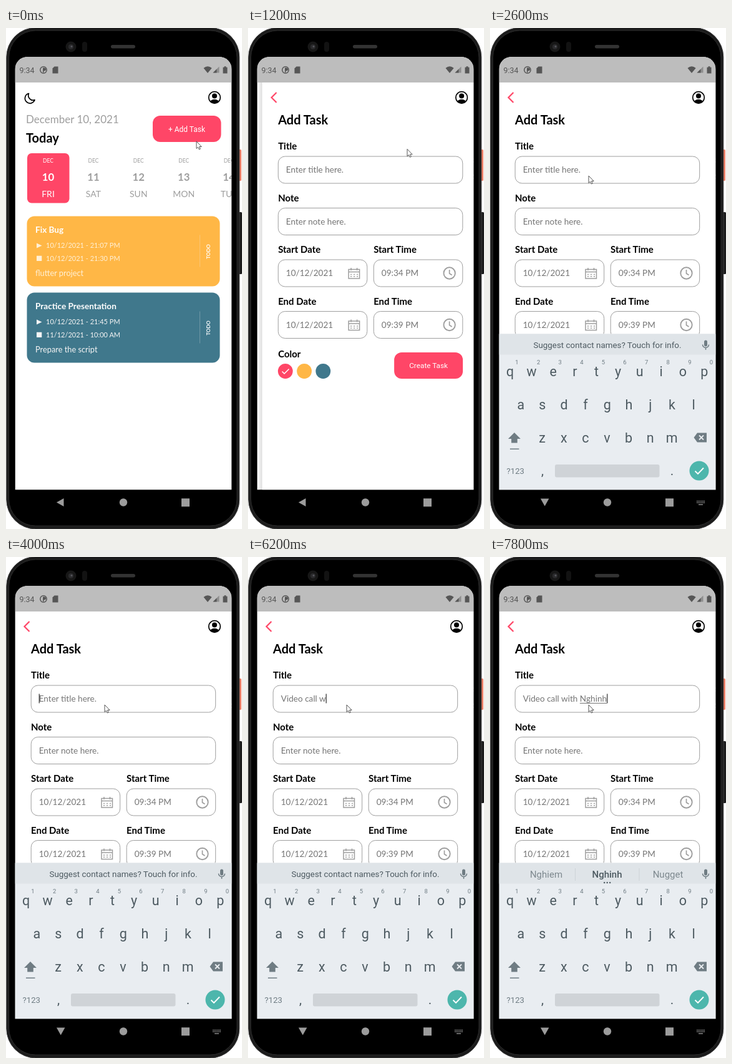
An HTML page that plays this animation: 378x800 px, repeating every 8000 ms.

```html
<!DOCTYPE html>
<html lang="en">
<head>
<meta charset="utf-8">
<title>Add task</title>
<style>
html, body { margin: 0; height: 100%; overflow: hidden; background: #fff; }
svg { display: block; width: 100%; height: 100%; }
text { font-family: Lato, sans-serif; white-space: pre; }
.kb text, .ui { font-family: Roboto, sans-serif; }
.mid { text-anchor: middle; }
.b { font-weight: 700; }
.line { fill: none; stroke: #9e9e9e; }
</style>
</head>
<body>
<svg viewBox="0 0 378 800">
  <defs>
    <clipPath id="screen"><rect x="14.5" y="46" width="347" height="732" rx="20"/></clipPath>
    <clipPath id="app"><path d="M14.5 46H361.5V737.5H14.5z"/></clipPath>
    <clipPath id="face"><circle cx="334" cy="111" r="9"/></clipPath>
    <linearGradient id="shade"><stop stop-color="#000" stop-opacity="0"/><stop offset="1" stop-color="#000" stop-opacity=".14"/></linearGradient>
    <g id="avatar">
      <circle cx="334" cy="111" r="9.3" fill="#fff" stroke="#000" stroke-width="1.7"/>
      <circle cx="334" cy="108.5" r="4"/>
      <ellipse cx="334" cy="119" rx="7.5" ry="5" clip-path="url(#face)"/>
    </g>
  </defs>

  <!-- phone body -->
  <rect x="371" y="194" width="6" height="50" rx="1.5" fill="#f08068"/>
  <rect x="371" y="294" width="7" height="99" rx="1.5" fill="#1c1c1c"/>
  <rect x=".8" y="-.5" width="373" height="800.5" rx="47" fill="#1b1b1b" stroke="#3c3c3c"/>
  <rect x="4.5" y="4" width="365.5" height="791" rx="43" stroke="#2e2e2e"/>
  <circle cx="104" cy="30" r="8.5" fill="#171717"/><circle cx="104" cy="30" r="4" fill="#2b2b2d"/><circle cx="105" cy="29.500" r="1.500" fill="#55555a"/>
  <rect x="122" y="22" width="8" height="16" rx="4" fill="#121212"/>
  <rect x="168" y="27" width="39" height="5.500" rx="2.700" fill="#333"/>

  <g clip-path="url(#screen)">
    <g clip-path="url(#app)">
      <path d="M14 46H362V738H14z" fill="#fff"/>
      <g id="home">
        <path d="M36.500 104.500A8 8 0 1 0 46 114.800A7.600 7.600 0 0 1 36.500 104.500z" fill="none" stroke="#000" stroke-width="1.700" stroke-linejoin="round"/>
        <use href="#avatar"/>
        <text x="32" y="151.500" font-size="17" fill="#9e9e9e">December 10, 2021</text>
        <text x="32" y="183" font-size="20" class="b">Today</text>
        <rect x="235" y="140" width="109.500" height="42" rx="12" fill="#ff4667"/>
        <text x="289.500" y="165.500" font-size="12" fill="#fff" class="ui mid">+ Add Task</text>
        <rect x="34" y="200" width="67.500" height="79.500" rx="7" fill="#ff4667"/>
      </g>
      <g id="form">
        <rect x="7" y="46" width="8" height="692" fill="url(#shade)"/>
        <path d="M14.500 87H362V738H14.500z" fill="#fff"/>
        <path d="M37.500 103L29.500 111L37.500 119" fill="none" stroke="#ff4667" stroke-width="2.200"/>
        <use href="#avatar"/>
        <text x="40" y="154.300" font-size="20" class="b">Add Task</text>
        <g id="fields"></g>
        <text x="40" y="526" font-size="15" class="b">Color</text>
        <circle cx="51.700" cy="548" r="11.900" fill="#ff4667"/>
        <circle cx="82" cy="548" r="11.900" fill="#ffb746"/>
        <circle cx="112.200" cy="548" r="11.900" fill="#40788c"/>
        <path d="M46.500 548.500L50 552L57.500 544.500" fill="none" stroke="#fff" stroke-width="1.500"/>
        <rect x="226" y="518" width="110" height="42" rx="12" fill="#ff4667"/>
        <text x="281" y="543.300" font-size="11.800" fill="#fff" class="ui mid">Create Task</text>
        <path id="under" d="" stroke="#757575"/>
        <path id="caret" d="M0 218.500V233.500" stroke="#555" stroke-width="1.500"/>
      </g>

      <!-- status bar -->
      <path d="M14 46H362V87H14z" fill="#bdbdbd"/>
      <g fill="#565656">
        <text x="21.500" y="71.500" font-size="12.500" class="ui">9:34</text>
        <circle cx="60" cy="67" r="5.200" fill="none" stroke="#565656" stroke-width="1.500"/>
        <path d="M59 71V63.500H61.500A2.500 2.500 0 0 1 61.500 68.500H60.500V71z"/>
        <path d="M77.500 61.500H83.500V72.500H74.500V64.500z"/>
        <path d="M316.500 64Q323 58.500 329.700 64L323 72z"/>
        <path d="M331.500 71.500L341.500 61.500V71.500z" fill-opacity=".45"/><path d="M331.500 71.500L337.500 65.500V71.500z"/>
        <path d="M347.500 62.800H349.500V61.300H352.500V62.800H354.500V72.500H347.500z"/>
      </g>

      <!-- keyboard -->
      <g id="board" class="kb" fill="#4d5a61">
        <path d="M14 488.500H362V738H14z" fill="#e9edf1"/>
        <path d="M14 488.500H362V521.500H14z" fill="#dfe4e8"/>
        <text id="hint" x="188" y="511.300" font-size="13.400" class="mid">Suggest contact names? Touch for info.</text>
        <g id="picks">
          <path d="M136.500 497V517M239 497V517" stroke="#cdd3d7"/>
          <g class="mid" font-size="15" fill="#7d888e">
            <text x="90" y="512"></text>
            <text x="187.500" y="512" fill="#4d5a61" font-weight="500"></text>
            <text x="285" y="512"></text>
          </g>
          <g fill="#4d5a61"><circle cx="183.200" cy="520" r="1.200"/><circle cx="187.700" cy="520" r="1.200"/><circle cx="192.200" cy="520" r="1.200"/></g>
        </g>
        <g fill="#6f7c83">
          <rect x="343" y="498.500" width="5" height="10" rx="2.500"/>
          <path d="M340.500 505.500A5 5 0 0 0 350.500 505.500M345.500 510.500V514" fill="none" stroke="#6f7c83" stroke-width="1.500"/>
          <path d="M39 646L49 656H43.800V662.500H34.200V656H29z"/>
          <path d="M32 671.500H46.500V673H32z"/>
          <path d="M326.500 654L332 646.500H347V661.500H332z"/>
          <path d="M335 650.500L342 657.500M342 650.500L335 657.500" stroke="#e9edf1" stroke-width="1.800"/>
          <text x="26.500" y="711.700" font-size="13.200">?123</text>
        </g>
        <g id="keys" class="mid" font-size="21.500"></g>
        <rect x="104" y="697" width="167.500" height="20.500" rx="3" fill="#cfd3d7"/>
        <circle cx="335" cy="707" r="15.500" fill="#4db6ac"/>
        <path d="M328.500 707.500L333 712L342 702.500" fill="none" stroke="#fff" stroke-width="1.900"/>
      </g>
    </g>

    <!-- navigation bar -->
    <path d="M14 737.500H362V780H14z"/>
    <path id="strip" d="M14 766H362V780H14z" fill="#dde2e5"/>
    <g fill="#9c9c9c">
      <path id="back" d="M81 757.500L92.500 751V764z"/>
      <circle cx="188" cy="757.500" r="6.200"/>
      <path d="M281 751.200H294V764.200H281z"/>
      <g id="switch" fill="none" stroke="#8a8a8a">
        <path d="M331 755.500H344M331 758H344" stroke-dasharray="1.500 .800" stroke-width="1.500"/>
        <path d="M334 761H341" stroke-width="1.500"/>
      </g>
    </g>
  </g>

  <path id="mouse" d="M0 0V11.500L2.600 9.200L4.400 13L6.300 12.100L4.600 8.500H8.200z" fill="#fff" stroke="#555" stroke-linejoin="round"/>
</svg>
<script>
const $ = id => document.getElementById(id);
const add = (id, markup) => $(id).insertAdjacentHTML('beforeend', markup);
const text = (x, y, size, s, rest = '') => `<text x="${x}" y="${y}" font-size="${size}" ${rest}>${s}</text>`;

// Home: day strip and task cards
['FRI', 'SAT', 'SUN', 'MON', 'TUE'].forEach((day, i) => {
  const x = 67.5 + i * 72.4;
  add('home', `<g class="mid" fill="${i ? '#9e9e9e' : '#fff'}">` + text(x, 215.3, 8.5, 'DEC') +
    text(x, 244, 16.8, 10 + i, 'class="b"') + text(x, 270, 14, day) + '</g>');
});

function card(y, fill, ink, title, from, to, note) {
  add('home', `<g transform="translate(0 ${y})" fill="${ink}">
    <rect x="33.5" width="309" height="112" rx="12" fill="${fill}"/>
    ${text(47, 26.5, 13.6, title, 'class="b" fill="#fff"')}
    <path d="M49 43L57.5 47L49 51zM49 63.300H57.300V71.600H49z"/>
    ${text(64, 50.7, 11, from)}${text(64, 71, 11, to)}${text(47, 95.8, 12.8, note)}
    <path d="M310.500 30V81" stroke="#eee" stroke-opacity=".4" stroke-width=".7"/>
    ${text(0, 0, 8, 'TODO', 'class="b mid" fill="#fff" transform="translate(327 56.500) rotate(-90)"')}</g>`);
}
card(300.5, '#ffb746', '#fff0d6', 'Fix Bug', '10/12/2021 - 21:07 PM', '10/12/2021 - 21:30 PM', 'flutter project');
card(422.5, '#40788c', '#f5f5f5', 'Practice Presentation', '10/12/2021 - 21:45 PM', '11/12/2021 - 10:00 AM', 'Prepare the script');

// Form fields
const calendar = `<path d="M153 385.500H170.500V400H153zM153 389.500H170.500M157 383V387M166.500 383V387" stroke-width="1.500"/>
  <path d="M156 393.500H168M156 396.800H168" stroke-width="1.500" stroke-dasharray="2 3"/>`;
const clock = '<circle cx="314.500" cy="391.500" r="9.200" stroke-width="1.900"/><path d="M314.500 386V392L318.500 394.500" stroke-width="1.700"/>';

function field(x, y, w, label, value, icon = '', id = '') {
  add('fields', text(x, y - 10.7, 15, label, 'class="b"') +
    `<g class="line"><rect x="${x + .2}" y="${y}" width="${w}" height="43" rx="11"/>
    <g transform="translate(0 ${y - 370})">${icon}</g></g>` +
    text(x + 12.7, y + 26, 13.6, value, `fill="#757575" id="${id}"`));
}
field(40, 205, 295.5, 'Title', '', '', 'title');
field(40, 287.5, 295.5, 'Note', 'Enter note here.', '', 'note');
[['Start', '09:34 PM'], ['End', '09:39 PM']].forEach(([name, time], i) => {
  const y = 370 + i * 82.5;
  field(40, y, 142.5, name + ' Date', '10/12/2021', calendar, name + 'Date');
  field(193, y, 142.5, name + ' Time', time, clock, name + 'Time');
});

// Keyboard letters
[['qwertyuiop', 32, 555.5], ['asdfghjkl', 49.3, 608.5], ['zxcvbnm', 83.7, 661.5]].forEach(([row, x0, y], r) =>
  [...row].forEach((c, i) => {
    const x = x0 + i * 34.6;
    add('keys', text(x, y, 21.5, c) + (r ? '' : text(x + 11, 537, 9.5, (i + 1) % 10, 'fill="#6f7c83"')));
  }));
add('keys', text(84, 713.5, 21, ',') + text(291.5, 713.5, 21, '.'));

const LOOP = 8000, STEP = 200;
const phrase = 'Video call with Nghinh';
const clamp = v => Math.min(1, Math.max(0, v));
const show = (id, on) => $(id).setAttribute('visibility', on ? 'inherit' : 'hidden');
const move = (id, x, y) => $(id).setAttribute('transform', `translate(${x} ${y})`);

// Linear track through [time, value] points
function track(t, points) {
  let [t0, v0] = points[0];
  for (const [t1, v1] of points) {
    if (t < t1) return v0 + (v1 - v0) * (t - t0) / (t1 - t0);
    [t0, v0] = [t1, v1];
  }
  return v0;
}

function draw(t) {
  const slide = (1 - clamp((t - 946) / 300)) ** 2;
  move('form', 346 * slide, 0);
  show('form', slide < 1);

  move('mouse', track(t, [[0, 305], [400, 303.5], [1000, 303.5], [1600, 158]]),
    track(t, [[0, 181], [400, 172], [1000, 172], [1600, 236]]));

  const rise = clamp((t - 1800) / 400);
  move('board', 0, 250 * (1 - rise) ** 2);
  show('board', rise > 0);
  show('strip', t >= 1700 && t < 2000);
  show('switch', t >= 1700);
  $('back').setAttribute('d', t < 2000 ? 'M81 757.500L92.500 751V764z' : 'M81 751.500H94.500L87.700 763.500z');

  const typed = phrase.slice(0, Math.floor(track(t, [[4300, 0], [5200, 6], [7000, 18], [7800, 22]]) + 1e-6));
  const title = $('title');
  title.textContent = typed;
  const width = typed ? title.getComputedTextLength() : 0;
  if (!typed) title.textContent = 'Enter title here.';
  move('caret', 53.3 + width, 0);
  show('caret', t >= 1700 && (typed || (t - 1700) % 1000 < 500));

  const known = t >= 7400;
  if (known) {
    const start = 52.7 + title.getSubStringLength(0, 16);
    $('under').setAttribute('d', `M${start} 233.500H${52.7 + width}`);
  }
  show('under', known);

  const picking = t >= 6800;
  const words = known ? ['Nghiem', typed.slice(16), 'Nugget'] : ['In', 'N', 'Not'];
  document.querySelectorAll('#picks text').forEach((el, i) => el.textContent = words[i]);
  show('hint', !picking);
  show('picks', picking);
}

function tick(now) {
  draw(Math.floor(now % LOOP / STEP) * STEP);
  requestAnimationFrame(tick);
}
tick(performance.now());
</script>
</body>
</html>
```
